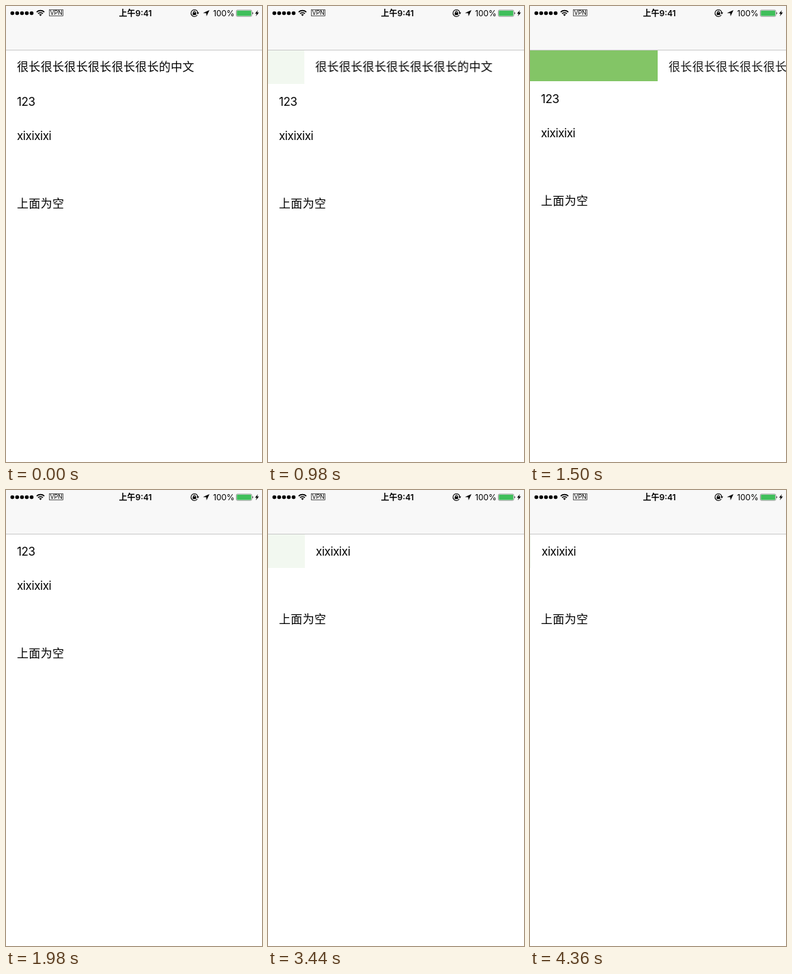
An HTML page for the animation above (4380 ms loop, 375 by 667 pixels).

```html
<!DOCTYPE html>
<html lang="zh">
<head>
<meta charset="utf-8">
<title>Swipe list</title>
<style>
  html, body { margin: 0; width: 100%; height: 100%; overflow: hidden; background: #fff; }
  .screen {
    position: relative; width: 375px; height: 667px; overflow: hidden;
    font: 17px/52px Inter, "Noto Sans CJK SC", "Noto Sans CJK", sans-serif;
    color: #000; background: #fff;
  }
  .bar {
    position: absolute; z-index: 1; top: 0; left: 0; width: 375px; height: 64px;
    background: #f8f8f8; border-bottom: 1px solid #c9c9c9;
  }
  .bar svg { display: block; }
  .list { position: absolute; top: 64px; left: 0; width: 375px; }
  .row { height: 50px; overflow: hidden; white-space: nowrap; }
  .cell {
    box-sizing: border-box; width: 375px; height: 50px; padding-left: 16px;
    background: #fff; letter-spacing: -.41px;
  }
  .han { letter-spacing: .33px; line-height: 50px; }
  .row, .cell, .cell span { animation: 4380ms linear infinite; }

  /* Rows collapse while their cell leaves; the tint turns solid past the trigger. */
  .first { animation-name: collapse1, tint1; }
  .first .cell { animation-name: swipe1; }
  .first span { animation-name: fade1; }
  .second { animation-name: collapse2, tint2; }
  .second .cell { animation-name: swipe2; }
  .third { background: #f2f8f0; }
  .third .cell { animation-name: swipe3; }

  @keyframes collapse1 {
    0% { height: 50px; }
    31.507% { height: 50px; animation-timing-function: ease-in-out; }
    45.205%, 100% { height: 0; }
  }
  @keyframes tint1 {
    0%, 24.25% { background: #f2f8f0; }
    24.251%, 100% { background: #83c566; }
  }
  @keyframes fade1 {
    0% { opacity: 1; }
    31.507% { opacity: 1; animation-timing-function: ease-in-out; }
    45.205%, 100% { opacity: 0; }
  }
  @keyframes swipe1 {
    0%, 12.785% { transform: translateX(0); }
    15.068% { transform: translateX(4.4px); }
    17.352% { transform: translateX(14.6px); }
    19.635% { transform: translateX(29.5px); }
    22.374% { transform: translateX(53px); }
    25.114% { transform: translateX(85px); }
    31.507% { transform: translateX(170px); animation-timing-function: ease-in-out; }
    45.205%, 100% { transform: translateX(375px); }
  }

  @keyframes collapse2 {
    0% { height: 50px; }
    54.338% { height: 50px; animation-timing-function: ease-in-out; }
    68.037%, 100% { height: 0; }
  }
  @keyframes tint2 {
    0%, 53.425% { background: #ffefea; }
    53.426%, 100% { background: #ff5b2a; }
  }
  @keyframes swipe2 {
    0%, 51.142% { transform: translateX(0); }
    51.598% { transform: translateX(-4px); }
    52.511% { transform: translateX(-28px); }
    53.425% { transform: translateX(-75px); }
    54.338% { transform: translateX(-123px); animation-timing-function: ease-in-out; }
    68.037%, 100% { transform: translateX(-375px); }
  }

  @keyframes swipe3 {
    0%, 71.233% { transform: translateX(0); }
    73.059% { transform: translateX(9px); }
    75.799% { transform: translateX(34px); }
    78.539% { transform: translateX(54px); }
    80.822% { transform: translateX(57.5px); }
    83.562% { transform: translateX(60px); }
    88.128% { transform: translateX(70px); }
    89.954% { transform: translateX(72px); }
    92.009% { transform: translateX(72px); animation-timing-function: ease-in-out; }
    100% { transform: translateX(.6px); }
  }
</style>
</head>
<body>
<div class="screen">
  <div class="bar">
    <svg width="375" height="20" viewBox="0 0 375 20" font-size="12">
      <path d="M9.3 10.5h28.3" stroke="#000" stroke-width="5.6" stroke-linecap="round" stroke-dasharray="0.01 7.04"/>
      <g fill="none" stroke="#000" stroke-width="1.7">
        <path d="M44.9 8.9a8.2 8.2 0 0 1 11.2 0"/>
        <path d="M47 11.2a5.1 5.1 0 0 1 7 0"/>
      </g>
      <path d="M48.5 12.6a2.9 2.9 0 0 1 4 0l-2 2.1z"/>
      <rect x="63.5" y="5.5" width="20" height="9" fill="none" stroke="#333" stroke-width=".8"/>
      <text x="73.6" y="13.2" font-size="8.8" text-anchor="middle">VPN</text>
      <text x="189.6" y="14.8" font-weight="600" text-anchor="middle">上午9:41</text>

      <path d="M280.2 13.2a5 5 0 1 1 .8-2.9" fill="none" stroke="#000" stroke-width="1.1"/>
      <path d="M279 9.6h4l-2 2.7z"/>
      <rect x="273.5" y="9.6" width="5" height="3.7" rx=".4"/>
      <path d="M274.6 10V8.9a1.4 1.4 0 0 1 2.8 0V10" fill="none" stroke="#000"/>
      <path d="M298 6l-4.2 9-.5-4.4-4.8-.4z"/>
      <text x="334.6" y="14.8" text-anchor="end" letter-spacing="-.1">100%</text>

      <rect x="337.4" y="6" width="22.6" height="9.2" rx="1.6" fill="#fff" stroke="#555" stroke-width=".6"/>
      <rect x="338.2" y="6.8" width="21" height="7.6" rx=".9" fill="#3fbf5b"/>
      <path d="M360.9 9a1.7 1.7 0 0 1 0 3.2z" fill="#333"/>
      <path d="M369 6l-4.2 5.2h2.4l-1.2 3.8 4.5-5.4h-2.6z"/>
    </svg>
  </div>
  <div class="list">
    <div class="row first"><div class="cell han"><span>很长很长很长很长很长很长的中文</span></div></div>
    <div class="row second"><div class="cell">123</div></div>
    <div class="row third"><div class="cell">xixixixi</div></div>
    <div class="row"><div class="cell"></div></div>
    <div class="row"><div class="cell han">上面为空</div></div>
  </div>
</div>
</body>
</html>
```
